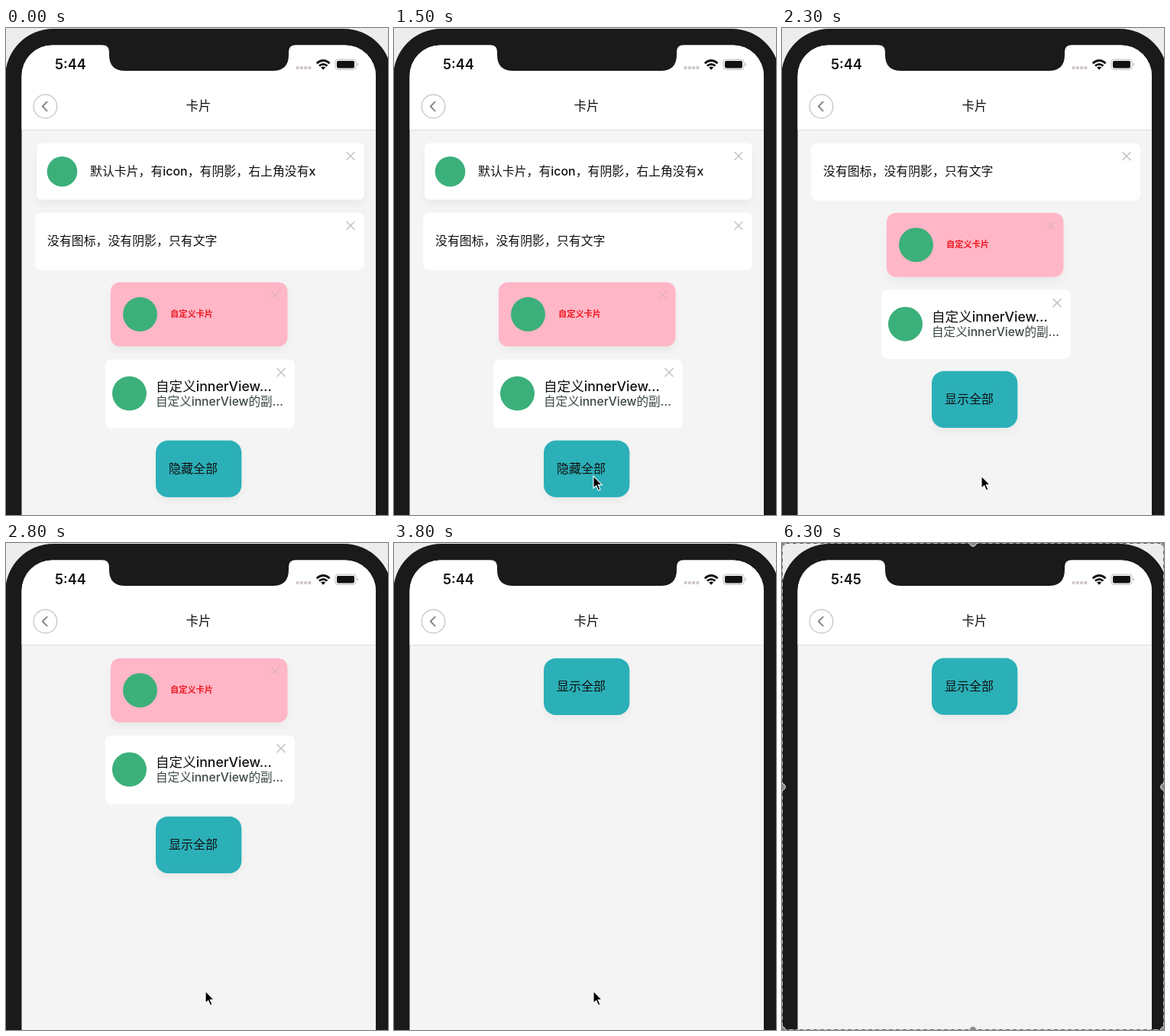
An HTML page that plays this animation: 500x637 px, repeating every 6500 ms.

```html
<!DOCTYPE html>
<html lang="zh-CN">
<head>
<meta charset="utf-8">
<title>卡片</title>
<style>
  html, body { margin: 0; width: 100%; height: 100%; overflow: hidden; background: #ededed; }
  svg { display: block; width: 500px; height: 637px; }
  text { font-family: Inter, "Noto Sans CJK SC", "Noto Sans CJK", "Noto Sans CJK JP", sans-serif; font-size: 16px; font-weight: 500; fill: #111; }
  .shadow { filter: drop-shadow(0 6px 5px rgba(0, 0, 0, .04)); }
  .line { fill: none; stroke-linecap: round; stroke-linejoin: round; }
</style>
</head>
<body>
<svg id="stage" viewBox="0 0 500 637" xmlns="http://www.w3.org/2000/svg">
  <defs id="defs"></defs>
  <rect width="500" height="637" fill="#ededed"/>
  <rect x="-1" y="1" width="506" height="760" rx="63" fill="#1a1a1a"/>
  <path d="M20.5 637V62.5A40 40 0 0 1 60.5 22.5H444A40 40 0 0 1 484 62.5V637Z" fill="#f4f4f4"/>
  <path d="M20.5 133V62.5A40 40 0 0 1 60.5 22.5H444A40 40 0 0 1 484 62.5V133Z" fill="#fff"/>
  <path d="M20.5 133.5H484" stroke="#dedede"/>
  <path d="M126 22Q135 22.5 135 31V35Q135 56 156 56H349Q370 56 370 35V31Q370 22.5 379 22Z" fill="#1a1a1a"/>

  <text id="clock" x="64" y="54" style="font-size:18px;font-weight:600">5:44</text>
  <g fill="#d0c8cc">
    <circle cx="381.5" cy="52" r="2.2"/><circle cx="386.8" cy="52" r="2.2"/>
    <circle cx="392.1" cy="52" r="2.2"/><circle cx="397.4" cy="52" r="2.2"/>
  </g>
  <g fill="none" stroke="#111" stroke-width="2.7">
    <path d="M406.8 46.2Q415.2 38.8 423.6 46.2"/>
    <path d="M409.9 49.6Q415.2 45 420.5 49.6"/>
  </g>
  <path d="M412.2 51.6Q415.2 49.2 418.2 51.6L415.2 54.8Z" fill="#111"/>
  <rect x="431" y="41.2" width="27" height="13" rx="3.6" fill="none" stroke="#b0b8b5"/>
  <rect x="433" y="43" width="23" height="9.4" rx="1.8" fill="#111"/>
  <path d="M459.7 45.6Q462 47.7 459.7 49.8Z" fill="#9aa6a2"/>

  <circle cx="51.5" cy="102.5" r="15.3" fill="#fff" stroke="#c2c2c2" stroke-width="1.2"/>
  <path class="line" d="M53.6 96.6L47.8 102.5L53.6 108.4" stroke="#888" stroke-width="2"/>
  <text x="235.5" y="107.8" style="font-size:16.5px">卡片</text>

  <g id="cards"></g>
  <g id="button">
    <rect class="shadow" x="196" width="112.3" height="74.3" rx="16" fill="#2bb0b8"/>
    <text id="label" x="213" y="42.5"></text>
  </g>

  <path id="cursor" d="M0 0V16L3.7 12.6L6.4 18.8L9 17.7L6.3 11.6H11.3Z" fill="#000" stroke="#fff" stroke-width="1.1"/>
  <g id="selection">
    <rect x=".5" y=".5" width="499" height="636" fill="none" stroke="#555"/>
    <rect x=".5" y=".5" width="499" height="636" fill="none" stroke="#c4c4c4" stroke-dasharray="5 4"/>
    <g id="handles" fill="#8c8c8c" stroke="#d8d8d8"></g>
  </g>
</svg>
<script>
const LOOP = 6500, STEP = 100, TOP = 150.5;
const FIRST_HIDE = 1940, HIDE_GAP = 500, HIDE_TIME = 370;
const $ = id => document.getElementById(id);

const icon = (x, y, r) => `<circle cx="${x}" cy="${y}" r="${r}" fill="#3cb07a"/>`;
const cross = (x, y, color = '#c6c6c6') =>
  `<path class="line" stroke="${color}" stroke-width="1.6" d="M${x - 5} ${y - 5}l10 10m0 -10l-10 10"/>`;
const text = (x, y, words, style = '') => `<text x="${x}" y="${y}" style="${style}">${words}</text>`;

// Content positions are relative to each card's top edge.
const cards = [
  { x: 40, w: 429, h: 74, pitch: 91, r: 7, fill: '#fff', shadow: true,
    body: icon(73.5, 37.3, 19.8) + cross(451, 17) +
      text(110, 42.6, '默认卡片，有icon，有阴影，右上角没有x', 'font-size:15.9px') },
  { x: 38, w: 431, h: 75, pitch: 91, r: 8, fill: '#fff',
    body: text(54, 42.6, '没有图标，没有阴影，只有文字', 'font-size:15.9px') + cross(451, 17) },
  { x: 137, w: 231.5, h: 84, pitch: 101, r: 12, fill: '#ffb6c6', shadow: true,
    body: icon(175.5, 42, 22.5) + cross(352, 17, '#e6b2be') +
      text(215, 45.5, '自定义卡片', 'font-size:11.2px;font-weight:600;fill:#f01822') },
  { x: 130, w: 248, h: 90, pitch: 106, r: 8, fill: '#fff',
    body: icon(161.5, 44.5, 22.5) + cross(360, 17) +
      text(196, 41.5, '自定义innerView…', 'font-size:17.6px') +
      text(196, 60.5, '自定义innerView的副…', 'font-size:15.6px;fill:#3a4646') }
];

$('defs').innerHTML = cards.map((c, i) =>
  `<clipPath id="clip${i}"><rect x="${c.x}" width="${c.w}" height="${c.h}"/></clipPath>`).join('');
$('cards').innerHTML = cards.map((c, i) =>
  `<g><rect class="${c.shadow ? 'shadow' : ''}" x="${c.x}" width="${c.w}" height="${c.h}" rx="${c.r}" fill="${c.fill}"/>
   <g clip-path="url(#clip${i})"><g>${c.body}</g></g></g>`).join('');
cards.forEach((c, i) => {
  c.node = $('cards').children[i];
  c.panel = c.node.firstElementChild;
  c.content = c.node.lastElementChild.firstElementChild;
  c.clip = $('clip' + i).firstElementChild;
});
for (const x of [0, 250, 500])
  for (const y of [0, 319, 637])
    if (x !== 250 || y !== 319) $('handles').innerHTML += `<circle cx="${x}" cy="${y}" r="4.5"/>`;

const progress = (t, start, length) => Math.min(1, Math.max(0, (t - start) / length));
const ease = p => p < .5 ? 2 * p * p : 1 - 2 * (1 - p) ** 2;
const move = (node, x, y) => node.setAttribute('transform', `translate(${x} ${y})`);
const show = (node, on) => node.setAttribute('visibility', on ? 'visible' : 'hidden');

function draw(t) {
  let y = TOP;
  cards.forEach((c, i) => {
    const left = 1 - ease(progress(t, FIRST_HIDE + i * HIDE_GAP, HIDE_TIME));
    const height = c.h * left;
    move(c.node, 0, y);
    c.node.setAttribute('opacity', left);
    c.panel.setAttribute('height', height);
    c.clip.setAttribute('height', height);
    move(c.content, 0, (height - c.h) / 2);
    y += c.pitch * left;
  });
  move($('button'), 0, y);
  $('label').textContent = t < 1700 ? '隐藏全部' : '显示全部';
  $('clock').textContent = t < 5900 ? '5:44' : '5:45';

  const away = 1 - ease(progress(t, 800, 500)) + ease(progress(t, 4900, 400));
  move($('cursor'), 261 + 245 * away, 586 - 90 * away);
  show($('cursor'), away < 1);
  show($('selection'), t >= 5300);
}

function tick(now) {
  draw(Math.floor((now % LOOP) / STEP) * STEP);
  requestAnimationFrame(tick);
}
draw(0);
requestAnimationFrame(tick);
</script>
</body>
</html>
```
